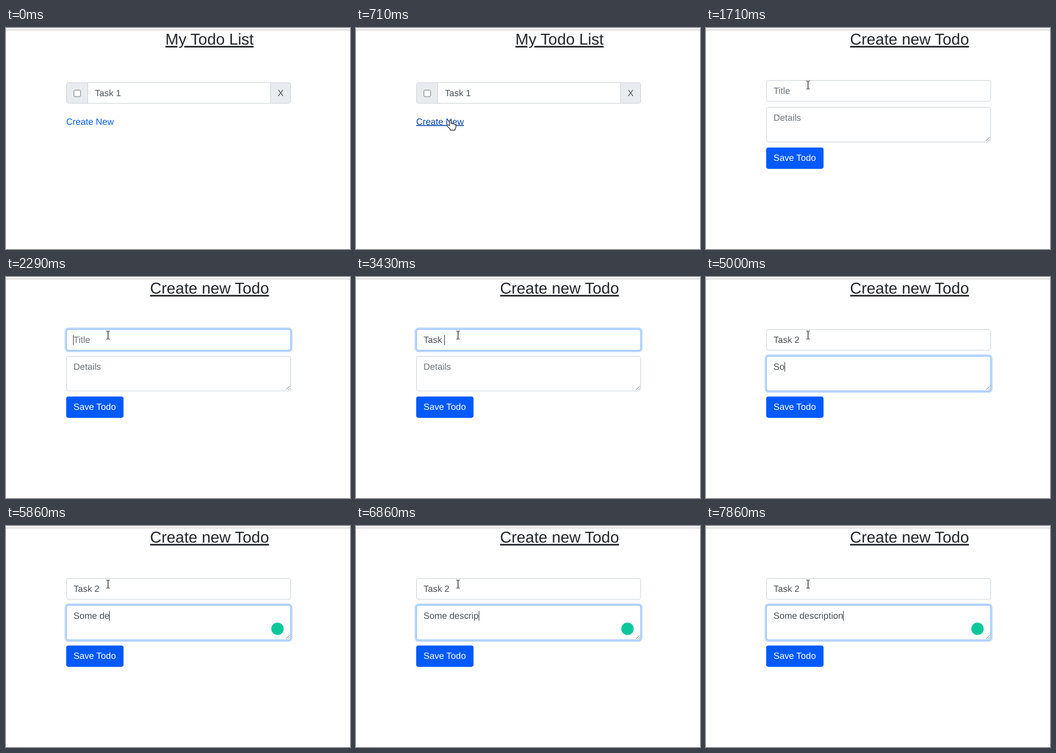
Recreate the animation shown at these times as an HTML page. Size 600 by 386 pixels, loop 8000 ms.

```html
<!DOCTYPE html>
<html lang="en">
<head>
<meta charset="utf-8">
<title>Todo list</title>
<style>
  html, body { margin: 0; width: 100%; height: 100%; overflow: hidden; background: #fff; }
  svg { display: block; width: 100%; height: 100%; }
  text {
    font: 15.72px "Liberation Sans", Arial, sans-serif;
    text-rendering: geometricPrecision;
    white-space: pre;
    fill: #495057;
  }
  .heading { font-size: 27.5px; fill: #212529; text-anchor: middle; text-decoration: underline; }
  .box { fill: #fff; stroke: #ced4da; }
  .addon { fill: #e9ecef; stroke: #ced4da; }
  .hint { fill: #6c757d; }
  .link { fill: #0a5cf5; }
  .link.hover { fill: #0044b0; text-decoration: underline; }
  .glow { fill: none; stroke: #bfd7ff; stroke-width: 3; }
  .focus { fill: none; stroke: #80bdff; }
  .caret { stroke: #343a40; }
  .grip { fill: none; stroke: #555; stroke-width: .9; }
</style>
</head>
<body>
<svg viewBox="0 0 600 386">
  <rect width="600" height="3" fill="#f7f7f7"/>
  <path d="M0 3.5H600" stroke="#c4c4c4"/>

  <g id="list">
    <text class="heading" x="355" y="29.3">My Todo List</text>
    <rect class="addon" x="105.5" y="95.5" width="391" height="36" rx="3.5"/>
    <rect class="box" x="142.5" y="95.5" width="319" height="36"/>
    <rect x="118.5" y="108.5" width="11.5" height="11.5" rx="2" fill="#fff" stroke="#767676"/>
    <text x="155" y="119">Task 1</text>
    <text x="479" y="119" text-anchor="middle">X</text>
    <text id="link" class="link" x="105" y="168.6">Create New</text>
  </g>

  <g id="form">
    <text class="heading" x="355" y="29.3">Create new Todo</text>
    <g id="title"></g>
    <g id="details"></g>
    <path class="grip" d="M488.5 197L495 190.5M492.5 197L495 194.5"/>
    <circle id="badge" cx="473.5" cy="179.5" r="10.8" fill="#0cc79c"/>
    <rect x="105" y="208.7" width="100" height="37.2" rx="3.8" fill="#005aff"/>
    <text x="117.7" y="232.4" style="fill:#fff">Save Todo</text>
  </g>

  <g id="arrow" fill="#222" stroke="#fff" stroke-width="1">
    <path d="M0 0V15.5L3.6 12.2L6 17.5L8.6 16.3L6.2 11.2H11Z"/>
  </g>
  <g id="hand" fill="#fff" stroke="#222" stroke-width="1.2" stroke-linejoin="round">
    <path d="M-1.5 9.5V1.2Q-1.5 -.4 0 -.4T1.5 1.2V6.2Q2 5 3.3 5.3T4.7 6.7Q5.3 5.8 6.5 6.2T7.8 7.7Q9.8 7 9.8 9.2V12Q9.8 14 8.2 15.3V17.3H-.2V15.6L-5.4 10.4Q-6.2 9 -5 8.3T-2.9 8.5Z"/>
  </g>
  <g id="beam" fill="none">
    <path d="M-2.6 -7.5H2.6M0 -7.5V6.5M-2.6 6.5H2.6" stroke="#fff" stroke-width="3"/>
    <path d="M-2.6 -7.5H-.7M.7 -7.5H2.6M0 -7V6M-2.6 6.5H-.7M.7 6.5H2.6" stroke="#222" stroke-width="1.3"/>
  </g>
</svg>
<script>
const LOOP = 8000;
const $ = id => document.getElementById(id);
const show = (node, on) => node.style.display = on ? '' : 'none';

// Each step: start time, then the values it changes.
const steps = [
  [0, { page: 'list', cursor: '', hover: false, focus: '', glow: 1, title: '', details: '', badge: false }],
  [140, { cursor: 'arrow', x: 163, y: 276 }],
  [290, { y: 239 }],
  [430, { x: 164, y: 203 }],
  [570, { x: 164.5, y: 174 }],
  [710, { cursor: 'hand', y: 161, hover: true }],
  [1000, { page: 'form' }],
  [1710, { cursor: 'beam', x: 178, y: 100 }],
  [2000, { y: 102, focus: 'title', glow: .5 }],
  [2140, { glow: 1 }],
  ...typing('title', 'Task 2', [[2860, 1], [3000, 2], [3140, 4], [3430, 5], [3860, 6]]),
  [4290, { focus: 'details' }],
  ...typing('details', 'Some description', [
    [4860, 1], [5000, 2], [5290, 3], [5430, 4], [5570, 5], [5860, 7], [6000, 8], [6290, 9],
    [6430, 10], [6570, 11], [6860, 12], [7000, 13], [7290, 14], [7430, 15], [7570, 16]]),
  [5860, { badge: true }]
].sort((a, b) => a[0] - b[0]);

function typing(field, text, marks) {
  return marks.map(([time, count]) => [time, { [field]: text.slice(0, count) }]);
}

function makeField(id, hint, top, height) {
  const left = 117.7, base = top + 23.5;
  const rect = (name, grow) =>
    `<rect class="${name}" x="${105.5 - grow}" y="${top + .5 - grow}" width="${391 + 2 * grow}" height="${height + 2 * grow}" rx="${3.5 + grow}"/>`;
  const root = $(id);
  root.innerHTML = rect('box', 0) +
    `<g class="ring">${rect('glow', 1.7)}${rect('focus', 0)}</g>
     <text class="hint" x="${left}" y="${base}">${hint}</text>
     <text class="value" x="${left}" y="${base}"></text>
     <path class="caret" d="M.5 ${top + 10.5}v17"/>`;
  const [ring, hintText, value, caret] =
    ['.ring', '.hint', '.value', '.caret'].map(part => root.querySelector(part));
  return state => {
    const text = state[id], focused = state.focus === id;
    value.textContent = text;
    show(hintText, !text);
    show(ring, focused);
    show(caret, focused);
    ring.style.opacity = state.glow;
    const width = text ? value.getComputedTextLength() : 0;
    caret.setAttribute('transform', `translate(${Math.round(left + width - .3)} 0)`);
  };
}

const fields = [makeField('title', 'Title', 91, 36.5), makeField('details', 'Details', 138, 60.5)];

function draw(state) {
  show($('list'), state.page === 'list');
  show($('form'), state.page === 'form');
  $('link').classList.toggle('hover', state.hover);
  show($('badge'), state.badge);
  for (const update of fields) update(state);
  for (const name of ['arrow', 'hand', 'beam']) {
    show($(name), state.cursor === name);
    $(name).setAttribute('transform', `translate(${state.x || 0} ${state.y || 0})`);
  }
}

const start = performance.now();
let shown = -1;
function tick() {
  const time = (performance.now() - start) % LOOP;
  const past = steps.filter(([at]) => at <= time);
  if (past.length !== shown) {
    shown = past.length;
    draw(Object.assign({}, ...past.map(([, change]) => change)));
  }
  requestAnimationFrame(tick);
}
tick();
</script>
</body>
</html>
```
